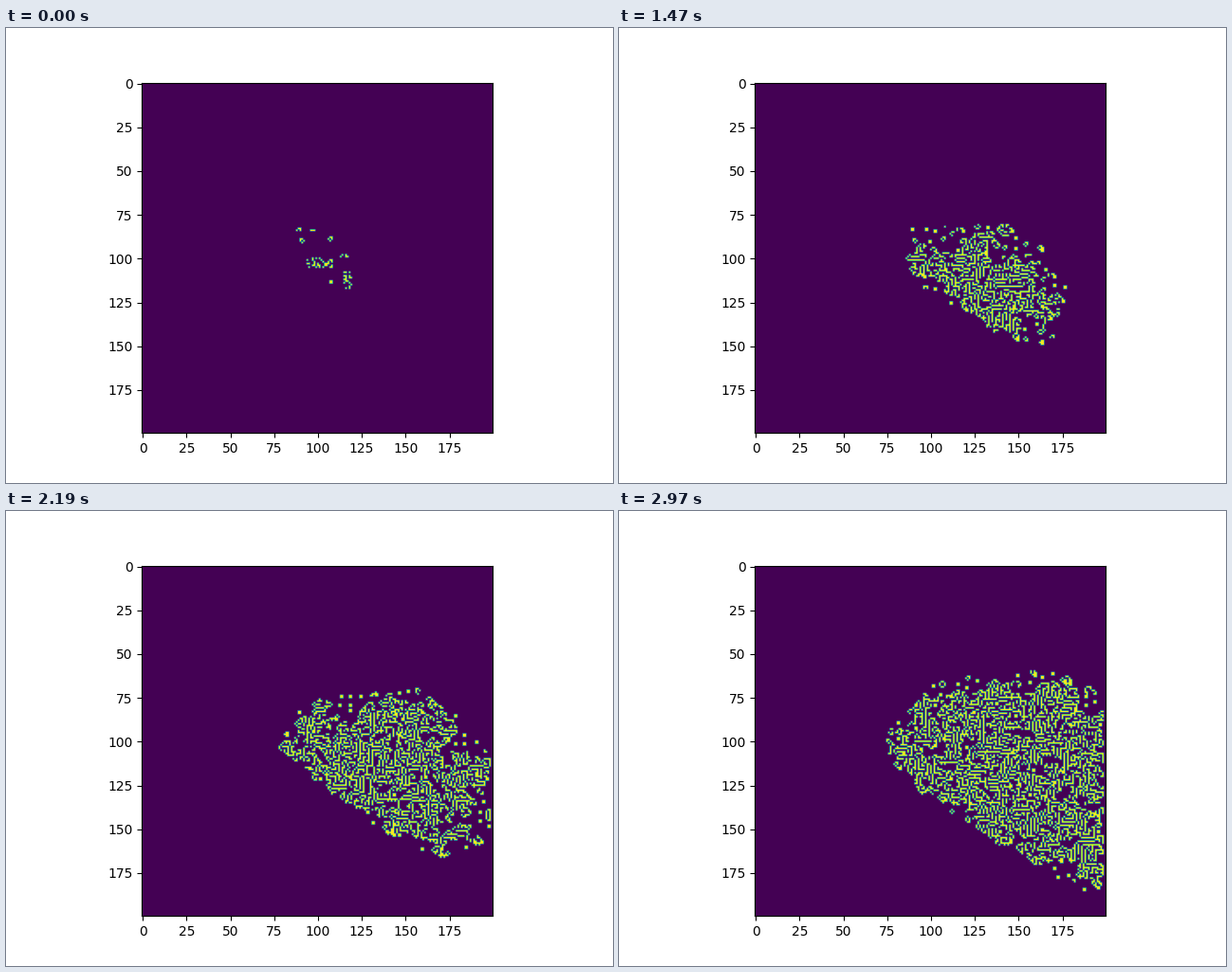
A matplotlib script that plays this animation: 640x480 px, repeating every 3 s.

```python
import numpy as np
import matplotlib.pyplot as plt
from matplotlib.animation import FuncAnimation
from matplotlib.path import Path

N, FRAMES, INTERVAL = 200, 100, 30
REACH = 3  # empty margin that lets new cells sprout

# Colony outline (x, y) at the first and last step, clockwise from its left tip;
# it runs past the right border at the end
START = np.array([(94, 101), (104, 98), (114, 98), (118, 103), (119, 110),
                  (119, 114), (117, 117), (112, 112), (100, 105)])
END = np.array([(69, 102), (98, 66), (171, 58), (206, 79), (241, 125),
                (222, 177), (190, 188), (138, 161), (87, 125)])

rng = np.random.default_rng(4)
yy, xx = np.mgrid[:N, :N]
POINTS = np.column_stack([xx.ravel(), yy.ravel()])


def place(grid, row, col, pattern):
    """Stamp a pattern such as 'oo/oo' with its top left cell at row, col."""
    for r, line in enumerate(pattern.split("/")):
        for c, mark in enumerate(line):
            grid[row + r, col + c] = mark == "o"


def soup(grid, row, col, height, width, density):
    grid[row:row + height, col:col + width] = rng.random((height, width)) < density


def first_state():
    grid = np.zeros((N, N), int)
    place(grid, 83, 88, ".oo/o.o")
    place(grid, 84, 96, "ooo")
    place(grid, 89, 90, "oo/o.o/.o")
    place(grid, 88, 106, ".oo/o.o/.o")
    place(grid, 98, 113, ".o.o/o..oo")
    place(grid, 113, 107, "oo/oo")
    soup(grid, 100, 94, 6, 15, 0.4)
    soup(grid, 108, 115, 10, 5, 0.45)
    return grid


def region(t):
    """Mask of the cells the colony may cover at step t."""
    outline = START + (END - START) * t / (FRAMES - 1)
    return Path(outline).contains_points(POINTS).reshape(N, N)


def near(grid, reach):
    """Mask of the cells with a live cell within reach."""
    for axis in (0, 1):
        grid = sum(np.roll(grid, d, axis) for d in range(-reach, reach + 1))
    return grid > 0


def step(grid):
    """Life rule applied in place, row by row, so changes run down and right."""
    for i in range(1, N - 1):
        row = grid[i]
        pair = grid[i - 1] + grid[i + 1]
        fixed = (pair[:-2] + pair[1:-1] + pair[2:] + row[2:]).tolist()
        left, new = 0, []
        for count, alive in zip(fixed, row[1:-1].tolist()):
            count += left
            left = int(count == 3 or (count == 2 and alive))
            new.append(left)
        row[1:-1] = new


def simulate():
    grid = first_state()
    home = near(grid, 1)
    states = [grid.copy()]
    for t in range(1, FRAMES):
        inside = region(t)
        bare = inside & ~near(grid, REACH)
        grid[bare] = rng.random(bare.sum()) < 0.35
        grid[~(inside | home)] = 0
        grid[[0, -1]] = 0
        grid[:, [0, -1]] = 0
        step(grid)
        states.append(grid.copy())
    return states


states = simulate()

fig, ax = plt.subplots(figsize=(6.4, 4.8), dpi=100)
image = ax.imshow(states[0], cmap="viridis", vmin=0, vmax=1)


def update(n):
    image.set_data(states[n])
    return [image]


anim = FuncAnimation(fig, update, frames=FRAMES, interval=INTERVAL,
                     repeat=True, repeat_delay=0)
plt.show()
```
